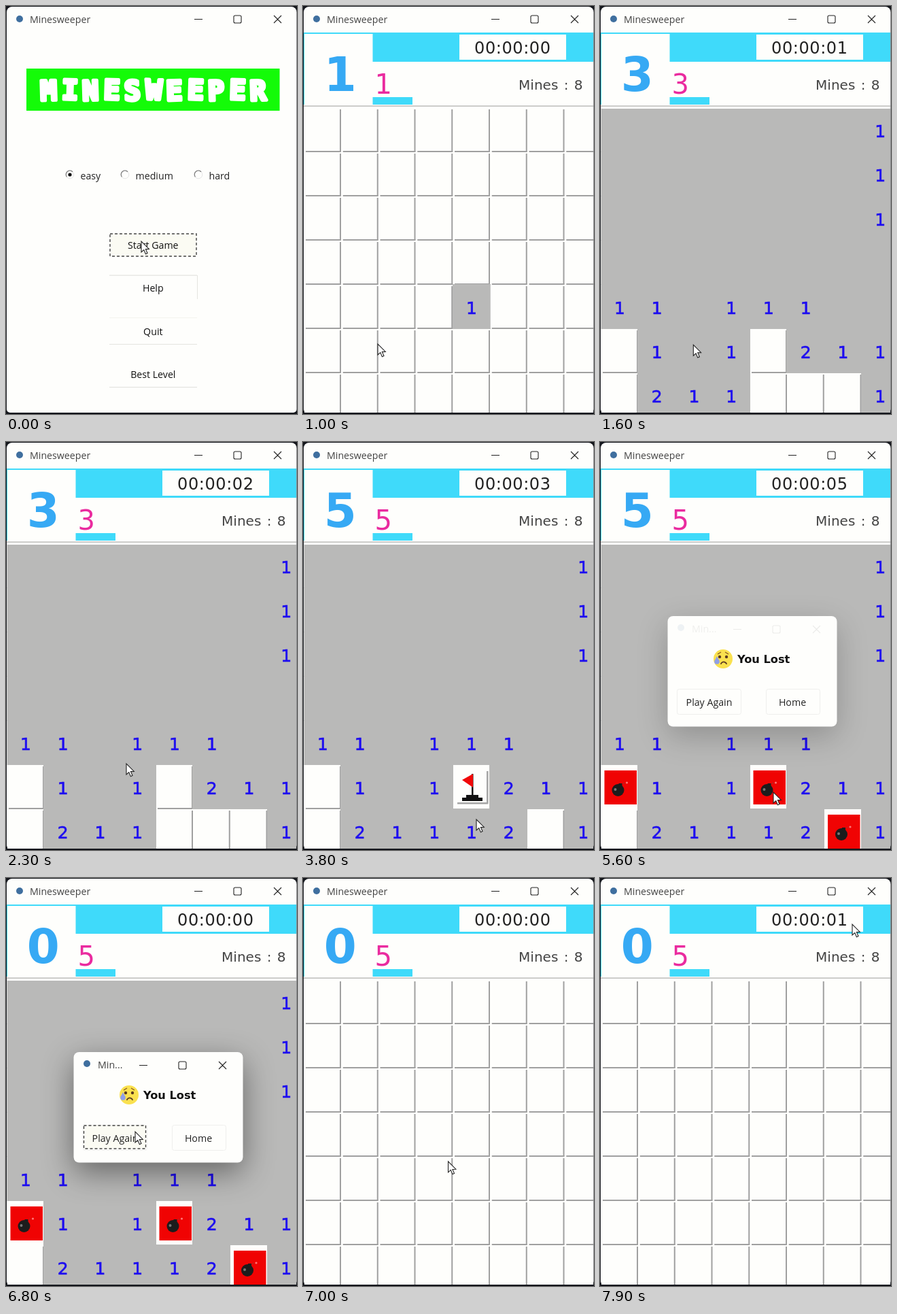
An HTML page with a canvas that plays this animation: 428 by 600 pixels, repeating every 8000 ms.

```html
<!DOCTYPE html>
<html lang="en">
<head>
<meta charset="utf-8">
<title>Minesweeper</title>
<style>
html, body { margin: 0; width: 100%; height: 100%; overflow: hidden; background: #111; }
canvas { display: block; }
</style>
</head>
<body>
<canvas id="stage" width="428" height="600"></canvas>
<script>
const ctx = document.getElementById('stage').getContext('2d');
const LOOP = 8000;
const UI = '14.2px "Open Sans", "Noto Sans", sans-serif';
const WIDE = '"DejaVu Sans", sans-serif';
const PAPER = '#fefefc', GREY = '#b9b9b8', CYAN = '#3fdafa', INK = '#222';

// Event times in ms
const T = { board: 200, first: 700, cascade: 1300, flag: 3000, open5: 3600, open4: 3750,
            lost: 4900, dialog: 5300, again: 6650, restart: 6900 };

// Cursor way points: time, x, y
const PATH = [[0, 199, 346], [200, 199, 346], [600, 243, 436], [720, 243, 436], [1000, 110, 497],
  [1200, 118, 499], [1800, 144, 498], [2300, 177, 473], [2800, 240, 498], [3050, 245, 502],
  [3400, 292, 566], [3620, 290, 564], [3740, 255, 555], [4300, 255, 555], [4700, 255, 515],
  [6000, 255, 515], [6500, 190, 373], [6850, 190, 373], [7100, 226, 440], [7300, 246, 527],
  [7700, 379, 110], [7900, 371, 68], [8000, 371, 68]];

// Board once cleared; space is an empty cell, # stays covered
const CELLS = ['       1', '       1', '       1', '        ', '11 111  ', '#1 1#211', '#211###1'];
const MINES = ['5,0', '5,4', '6,6'];

const clamp = v => Math.max(0, Math.min(1, v));

function rect(x, y, w, h, color) {
  ctx.fillStyle = color;
  ctx.fillRect(x, y, w, h);
}

function disc(x, y, r, color) {
  ctx.fillStyle = color;
  ctx.beginPath();
  ctx.arc(x, y, r, 0, 7);
  ctx.fill();
}

function stroke(color, width, build) {
  ctx.strokeStyle = color;
  ctx.lineWidth = width;
  ctx.beginPath();
  build();
  ctx.stroke();
}

function poly(points, color) {
  ctx.fillStyle = color;
  ctx.beginPath();
  points.forEach(([x, y]) => ctx.lineTo(x, y));
  ctx.closePath();
  ctx.fill();
}

function text(str, x, y, font, color = INK, align = 'left', wordSpacing = 0) {
  ctx.font = font;
  ctx.wordSpacing = wordSpacing + 'px';
  ctx.fillStyle = color;
  ctx.textAlign = align;
  ctx.fillText(str, x, y);
}

function windowIcons(min, max, close, y) {
  stroke(INK, 1.1, () => {
    ctx.moveTo(min, y); ctx.lineTo(min + 12, y);
    ctx.roundRect(max, y - 5.5, 11, 11, 2);
    ctx.moveTo(close, y - 5.5); ctx.lineTo(close + 11, y + 5.5);
    ctx.moveTo(close + 11, y - 5.5); ctx.lineTo(close, y + 5.5);
  });
}

function drawWindow() {
  rect(0, 0, 428, 600, '#14161c');
  ctx.fillStyle = PAPER;
  ctx.beginPath();
  ctx.roundRect(1, 1, 426.5, 597, [8, 8, 5, 5]);
  ctx.fill();
  disc(20, 19, 5, '#3f6f9f');
  text('Minesweeper', 35, 25, UI, '#444');
  windowIcons(277, 335, 394, 19.5);
}

function dashedBox(x, y, w, h) {
  rect(x, y, w, h, '#fbfbf3');
  ctx.setLineDash([4, 3]);
  stroke('#444', 1.4, () => ctx.rect(x, y, w, h));
  ctx.setLineDash([]);
}

// Heavy, slightly tumbling capitals
function drawLogo() {
  rect(30, 92, 372.5, 62, '#14fb08');
  ctx.font = 'bold 40px "DejaVu Sans Mono", monospace';
  ctx.textAlign = 'center';
  ctx.lineJoin = 'round';
  ctx.lineWidth = 5;
  ctx.fillStyle = ctx.strokeStyle = '#fff';
  [...'MINESWEEPER'].forEach((letter, i) => {
    const side = i % 2 ? 1 : -1;
    ctx.save();
    ctx.translate(63 + i * 30.8, 138 - side * 0.7);
    ctx.rotate(side * 0.03);
    ctx.strokeText(letter, 0, 0);
    ctx.fillText(letter, 0, 0);
    ctx.restore();
  });
  ctx.lineJoin = 'miter';
}

function drawMenu() {
  drawLogo();
  [['easy', 94], ['medium', 175], ['hard', 283]].forEach(([label, x]) => {
    stroke('#e6e6e6', 1, () => ctx.arc(x, 248, 5.8, 0, 7));
    stroke('#777', 1.2, () => ctx.arc(x, 248, 5.8, 2.5, 5.5));
    text(label, x + 15.5, 254.5, UI);
  });
  disc(94, 248, 2.6, '#111');

  dashedBox(153, 335, 127, 33);
  const line = '#e4e4e0';
  rect(152, 395.5, 129, 1.2, line);
  rect(281, 396, 1, 35, line);
  rect(152, 458, 129, 1, '#f3f3ef');
  rect(152, 497, 129, 1, line);
  rect(152, 560, 129, 1.2, line);
  ['Start Game', 'Help', 'Quit', 'Best Level'].forEach((label, i) =>
    text(label, 216.3, 357 + i * 63.4, UI, '#111', 'center'));
}

function drawHeader(clicks, best, seconds) {
  rect(1, 39, 426, 43, CYAN);
  rect(1, 82, 1, 63, CYAN);
  rect(2, 41, 100.5, 104, PAPER);
  rect(230, 42, 157, 37, PAPER);
  rect(102.5, 134, 58.5, 11, CYAN);
  rect(1, 146.5, 426, 1.3, '#b4b4b2');
  text(clicks, 54.7, 125, 'bold 69px ' + WIDE, '#36a9f4', 'center');
  text(best, 105.5, 129, '40px ' + WIDE, '#ea2b9f');
  ctx.letterSpacing = '0.6px';
  text('00:00:0' + seconds, 308.3, 70, '24px ' + WIDE, INK, 'center');
  ctx.letterSpacing = '0px';
  text('Mines : 8', 411.5, 122.5, '20px ' + WIDE, '#444', 'right', 2);
}

function coveredCell(x, y) {
  rect(x + 1, y + 1, 54, 64, PAPER);
  rect(x + 53, y + 3, 2, 62, '#a0a0a0');
  rect(x + 3, y + 64, 52, 2, '#a0a0a0');
}

function openCell(x, y, label) {
  rect(Math.floor(x), y, 56, 66, GREY);
  if (label === ' ') return;
  text(label, x + 28, y + 44, '25px ' + WIDE, '#1d0cf0', 'center');
  ctx.strokeStyle = '#1d0cf0';
  ctx.lineWidth = 0.6;
  ctx.strokeText(label, x + 28, y + 44);
}

function flagCell(x, y) {
  rect(x + 1, y + 1, 55, 65, PAPER);
  rect(x + 50, y + 10, 2.5, 48, '#a5a5a5');
  rect(x + 7, y + 56, 45, 2.5, '#a5a5a5');
  rect(x + 28, y + 14, 2.5, 32, '#111');
  poly([[x + 14, y + 23], [x + 30, y + 14], [x + 30, y + 34]], '#f00808');
  rect(x + 20, y + 45, 18, 5, '#111');
  rect(x + 14, y + 49, 30, 5, '#111');
}

function mineCell(x, y) {
  rect(x + 1, y + 1, 55.5, 66, PAPER);
  rect(x + 5.5, y + 9, 47.5, 50, '#f00303');
  disc(x + 25.5, y + 38, 9, '#1c1c1c');
  rect(x + 26.5, y + 28, 5, 4, '#1c1c1c');
  disc(x + 21.5, y + 37, 2, '#777');
  disc(x + 34, y + 28, 0.9, '#a03030');
  disc(x + 38.5, y + 27, 1.6, '#f77');
}

function drawBoard(t) {
  const fresh = t >= T.restart, cleared = t >= T.cascade && !fresh;
  ctx.save();
  ctx.beginPath();
  ctx.rect(1.5, 148, 425.5, 450);
  ctx.clip();
  CELLS.forEach((row, r) => [...row].forEach((label, c) => {
    const x = 1 + c * 54.75, y = 149 + r * 65, key = r + ',' + c;
    const mine = MINES.includes(key);
    if (key === '6,4' && t >= T.open4) label = '1';
    if (key === '6,5' && t >= T.open5) label = '2';
    const open = cleared ? label !== '#' : !fresh && key === '4,4' && t >= T.first;
    if (open) openCell(x, y, label);
    else if (mine && cleared && t >= T.lost) mineCell(x, y);
    else if (key === '5,4' && cleared && t >= T.flag) flagCell(x, y);
    else coveredCell(x, y);
  }));
  if (cleared) rect(1, 148, 426, 3, PAPER);
  ctx.restore();
}

function drawFace(x, y) {
  disc(x, y, 14, '#fae14f');
  disc(x - 5, y - 3, 2.2, '#5b3a22');
  disc(x + 5, y - 3, 2.2, '#5b3a22');
  stroke('#8a5a20', 1.3, () => {
    ctx.moveTo(x - 8, y - 7); ctx.lineTo(x - 3, y - 10);
    ctx.moveTo(x + 8, y - 7); ctx.lineTo(x + 3, y - 10);
  });
  stroke('#5b3a22', 1.8, () => ctx.arc(x + 1, y + 9, 4.5, 3.4, 6));
  disc(x - 9, y + 4, 3.8, '#8f9fe8');
  poly([[x - 12, y + 2], [x - 9, y - 4], [x - 6, y + 2]], '#8f9fe8');
}

function drawDialog(t) {
  const show = clamp((t - T.dialog) / 200);
  const settle = clamp((t - 5580) / 250);
  const scale = 0.9 + 0.1 * show;
  ctx.save();
  ctx.globalAlpha = show;
  ctx.translate(224, 337);
  ctx.scale(scale, scale);
  ctx.translate(-224, -337);

  // The shadow deepens as the window gains focus
  ctx.save();
  ctx.shadowColor = `rgba(0,0,0,${0.2 + 0.25 * settle})`;
  ctx.shadowBlur = 45;
  ctx.shadowOffsetY = 14;
  ctx.fillStyle = PAPER;
  ctx.beginPath();
  ctx.roundRect(99.5, 256, 249, 162.5, 8);
  ctx.fill();
  ctx.restore();

  drawFace(181, 319);
  text('You Lost', 202, 325, 'bold 16.2px ' + WIDE, '#111');
  stroke('#efefed', 1, () => {
    ctx.roundRect(113.5, 363.5, 94, 37, 3);
    ctx.roundRect(244.5, 363.5, 79, 37, 3);
  });
  if (t >= T.again) dashedBox(114.5, 364, 91, 34);
  text('Play Again', 160.5, 387.5, UI, INK, 'center');
  text('Home', 283, 387.5, UI, INK, 'center');

  // The caption fades in after the window body
  ctx.globalAlpha = show * Math.max(0.08, settle);
  disc(119, 273, 5, '#3f6f9f');
  text('Min...', 135, 280, UI, '#444');
  windowIcons(196, 254, 313, 275.5);
  ctx.restore();
}

function drawCursor(t) {
  const i = PATH.findIndex(p => p[0] > t);
  const [t0, x0, y0] = PATH[i - 1], [t1, x1, y1] = PATH[i];
  const u = (t - t0) / (t1 - t0), k = u * u * (3 - 2 * u);
  const arrow = [[0, 0], [0, 16], [3.8, 12.6], [6.4, 18.8], [9, 17.6], [6.4, 11.6], [11.3, 11.4]];
  ctx.save();
  ctx.translate(x0 + (x1 - x0) * k, y0 + (y1 - y0) * k);
  poly(arrow, '#fff');
  ctx.lineWidth = 1.1;
  ctx.strokeStyle = INK;
  ctx.stroke();
  ctx.restore();
}

function draw(t) {
  drawWindow();
  if (t < T.board) {
    drawMenu();
  } else {
    // The cascade counts as two clicks
    const clicks = [T.first, T.cascade, T.cascade, T.open5, T.open4].filter(at => t >= at).length;
    const reset = t >= T.again;
    const seconds = Math.max(0, Math.floor((t - 50) / 1000) - (reset ? 6 : 0));
    drawHeader(reset ? 0 : clicks, clicks, seconds);
    drawBoard(t);
    if (t >= T.dialog && t < T.restart) drawDialog(t);
  }
  drawCursor(t);
}

function frame() {
  draw(performance.now() % LOOP);
  requestAnimationFrame(frame);
}
frame();
</script>
</body>
</html>
```
